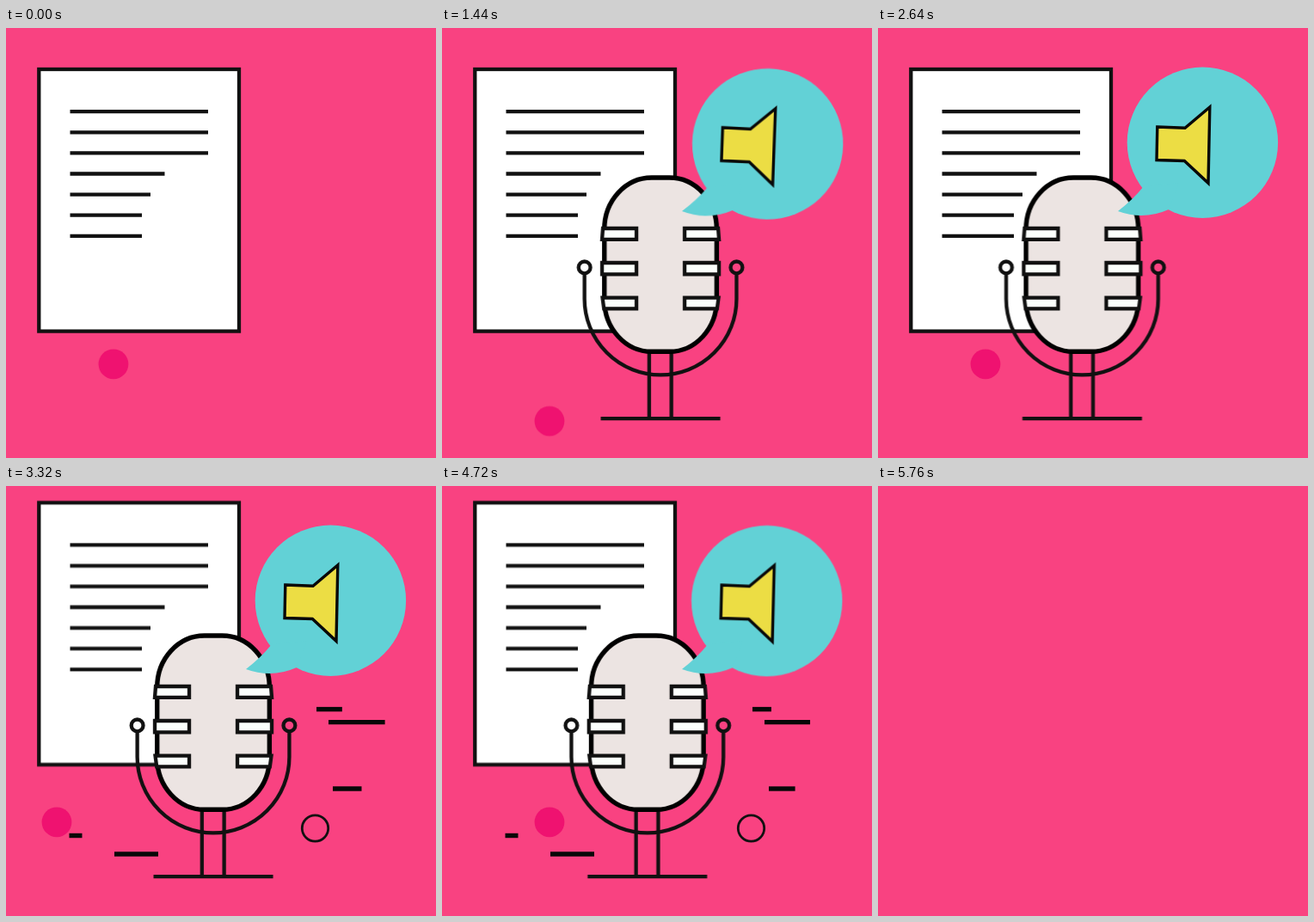
An HTML page without scripts that plays this animation: 500x500 px, repeating every 5.8 s.

```html
<!DOCTYPE html>
<html lang="en">
<head>
<meta charset="utf-8">
<title>Podcast microphone</title>
<style>
html, body { margin: 0; width: 100%; height: 100%; overflow: hidden; background: #f94281; }
svg { display: block; width: 100%; height: 100%; }

.scene { animation: show 5800ms step-end infinite; }
.paper { animation: hop 1450ms ease infinite; }
.dot { animation: wander 2900ms ease infinite; }
.sway { animation: sway 5800ms ease-in-out infinite; }
.mic { transform-origin: 0 456px; animation: mic 5800ms ease infinite; }
.tilt { transform-origin: 279px 213px; animation: tilt 5800ms ease-in-out infinite; }
.bubble { transform-origin: 279px 213px; animation: bubble 5800ms ease infinite; }
.ring { transform-origin: 359.5px 398px; animation: ring 1450ms ease-out infinite; }

.ink { fill: none; stroke: #111; stroke-width: 4.3; }
.dash path, .sound path { fill: none; stroke: #080808; stroke-dasharray: 1 3; stroke-dashoffset: 1.02; }
.dash path { stroke-width: 5.4; animation: dash 1450ms linear var(--d, 0ms) infinite; }
.sound path { stroke-width: 4.2; animation: sound 5800ms linear infinite; }

@keyframes show {
  0% { visibility: visible; }
  98.97%, 100% { visibility: hidden; }
}
@keyframes hop {
  0%, 62%, 100% { transform: none; }
  20%, 31% { transform: translateY(-28.6px); }
}
@keyframes wander {
  0%, 31%, 62%, 100% { transform: none; }
  10%, 15.5% { transform: translateX(-66px); }
  48.3%, 50% { transform: translateY(66.3px); }
}
@keyframes sway {
  0%, 12.93%, 95%, 100% { transform: translateX(245.8px); }
  25.86%, 68.97% { transform: translateX(254.2px); }
  41.9%, 51.72%, 84.48% { transform: translateX(237.4px); }
}
@keyframes mic {
  0%, .6%, 97.9%, 100% { transform: scale(0); }
  8.62%, 90.5% { transform: scale(1); }
}
@keyframes tilt {
  0%, 20.69%, 45.5%, 58.6%, 83.8%, 100% { transform: rotate(0deg); }
  31.03%, 34.48%, 72.4% { transform: rotate(2.8deg); }
}
@keyframes bubble {
  0%, 9%, 87.9%, 100% { transform: scale(0); }
  12.8%, 83.8% { transform: scale(1); }
}
@keyframes ring {
  0%, 16%, 50%, 100% { transform: scale(0); }
  25%, 40% { transform: scale(1); }
}
@keyframes dash {
  0%, 15.6% { stroke-dashoffset: 1.02; }
  36.3%, 49% { stroke-dashoffset: 0; }
  66.2%, 100% { stroke-dashoffset: -1.02; }
}
@keyframes sound {
  0%, 26.9% { stroke-dashoffset: 1.02; }
  29.66%, 32.8% { stroke-dashoffset: 0; }
  35.5% { stroke-dashoffset: -1.02; }
  35.51%, 65.5% { stroke-dashoffset: 1.02; }
  68.28%, 71.5% { stroke-dashoffset: 0; }
  75%, 100% { stroke-dashoffset: -1.02; }
}
</style>
</head>
<body>
<svg viewBox="0 0 500 500">
  <g class="scene">
    <g class="paper ink">
      <rect x="38.3" y="48" width="232.7" height="304.6" fill="#fff"/>
      <path d="M74.5 97.2H235M74.5 121.3H235M74.5 145.4H235M74.5 169.5H184.5M74.5 193.6H168M74.5 217.7H158M74.5 241.8H158"/>
    </g>

    <circle class="dot" cx="125" cy="390.8" r="17.4" fill="#ef1270"/>

    <g class="dash">
      <path pathLength="1" d="M73.5 406.5H88.5" style="--d:-210ms"/>
      <path pathLength="1" d="M126 428H177" style="--d:-210ms"/>
      <path pathLength="1" d="M361 259.6H407.5"/>
      <path pathLength="1" d="M375 274.6H449" style="--d:-72ms"/>
      <path pathLength="1" d="M380 352H413.5" style="--d:-130ms"/>
    </g>
    <circle class="ring" cx="359.5" cy="398" r="15.2" fill="none" stroke="#111" stroke-width="2.8"/>

    <g class="sway">
      <g class="mic ink">
        <path d="M-13.2 376V454M12.6 376V454M-69.5 454.2H69.5"/>
        <rect x="-65.3" y="174" width="130.6" height="202.3" rx="55" ry="60" fill="#ece4e2" stroke="#000" stroke-width="5.4"/>
        <g id="side">
          <path fill="#fbfffc" d="M-67 233H-28V245.8H-68ZM-68 273H-28V286.3H-68ZM-67.5 313.7H-28V326.3H-65.8Z"/>
          <circle cx="-88.4" cy="278.4" r="6.9"/>
        </g>
        <use href="#side" transform="scale(-1 1)"/>
        <path d="M-88.4 285.5V315A88.4 88.4 0 0 0 88.4 315V285.5"/>
      </g>
    </g>

    <g class="tilt">
      <g class="bubble">
        <g fill="#62d1d6">
          <circle cx="377.4" cy="133.2" r="87.7"/>
          <path d="M309 184Q296 200 279 213Q309 224 338 211L350 180Z"/>
        </g>
        <path d="M324.8 115L357 116.3L385.8 92L384 180.3L356.3 154.5L324 153.5Z" fill="#ecdd44" stroke="#080808" stroke-width="3.4"/>
        <g class="sound">
          <path pathLength="1" d="M403.1 101L415.7 88.6"/>
          <path pathLength="1" d="M407.4 127.4L427.4 125.8"/>
          <path pathLength="1" d="M407.1 148.9L425.3 151.3"/>
          <path pathLength="1" d="M402.3 171.1L413.7 182.7"/>
        </g>
      </g>
    </g>
  </g>
</svg>
</body>
</html>
```
